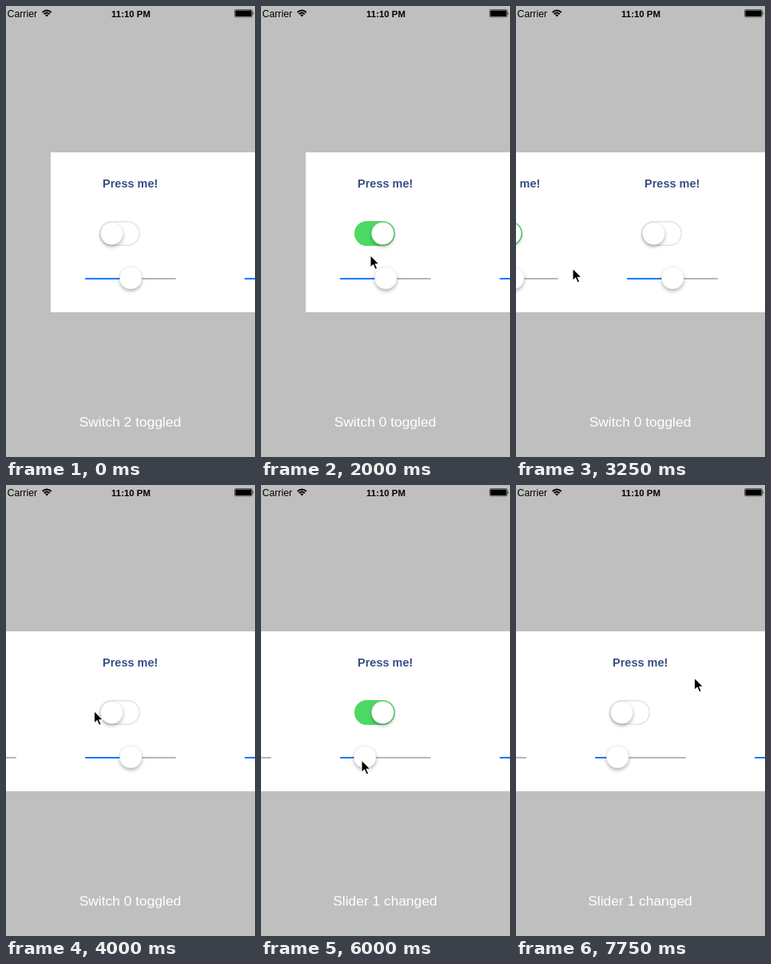
Animation, 312 px wide and 564 px high, one loop 8 s. Source, as an HTML page:

```html
<!DOCTYPE html>
<html lang="en">
<head>
<meta charset="utf-8">
<title>Paged controls</title>
<style>
  html, body { margin: 0; width: 100%; height: 100%; overflow: hidden; background: #bfbfbf; }
  svg { display: block; width: 312px; height: 564px; }
  text { font-family: "Liberation Sans", Arial, sans-serif; }
  .button { font-size: 14.5px; font-weight: bold; fill: #365083; text-anchor: middle; }
  .caption { font-size: 17.4px; fill: #fff; text-anchor: middle; }
  .clock { font-size: 11.4px; font-weight: bold; text-anchor: middle; }
  .carrier { font-size: 12.3px; }
  .knob { fill: #fff; stroke: #0002; stroke-width: .5; filter: url(#shadow); }
</style>
</head>
<body>
<svg viewBox="0 0 312 564">
  <defs>
    <filter id="shadow" x="-40%" y="-40%" width="180%" height="190%">
      <feDropShadow dx="0" dy="2.5" stdDeviation="2" flood-opacity=".3"/>
    </filter>
  </defs>
  <rect width="312" height="564" fill="#bfbfbf"/>

  <text class="carrier" x="1.5" y="14">Carrier</text>
  <g fill="none" stroke="#000" stroke-width="1.9">
    <path d="M45.6 8Q51.2 2.9 56.8 8M47.7 10.2Q51.2 7 54.7 10.2"/>
    <path d="M51.2 13.4L49.2 11.4Q51.2 9.8 53.2 11.4Z" fill="#000" stroke="none"/>
  </g>
  <text class="clock" x="156.5" y="14">11:10 PM</text>
  <rect x="286.5" y="4.5" width="22" height="9.4" rx="1.6" fill="none" stroke="#000" stroke-opacity=".65" stroke-width=".8"/>
  <rect x="287.4" y="5.4" width="20.2" height="7.6" rx=".8"/>
  <path d="M309.4 7.5q1.8 1.6 0 3.4z"/>

  <g id="strip"><rect y="183" width="1000" height="200" fill="#fff"/></g>
  <text class="caption" id="caption" x="155.5" y="526"></text>
  <path id="cursor" d="M0 0V15.6L3.6 12.2L6.2 18L8.8 16.8L6.3 11.2H11Z"
        fill="#000" stroke="#fff" stroke-width="1.1" stroke-linejoin="round"/>
</svg>
<script>
const LOOP = 8000, STEP = 250, PAGE = 200, LEFT = 56;
const $ = id => document.getElementById(id);

// Tracks: [time, value, ...] keys joined by straight lines
const scroll = [[2250, 0], [2500, 9], [2750, 30], [3000, 71], [3250, 160], [3500, 196], [3750, 200],
  [6500, 200], [6750, 212], [7000, 262], [7250, 380], [7500, 400]];
const pointer = [[250, 47, 187], [500, 108, 208], [750, 138, 221], [1000, 125.5, 261.5],
  [1250, 130, 280], [1750, 132, 283], [2250, 142, 340], [2500, 133, 340], [2750, 112.5, 340.5],
  [3000, 71, 338], [3500, 71, 318], [3750, 72, 302], [4000, 110.5, 282.5], [4250, 136, 284], [4500, 140, 285],
  [5000, 150, 335], [5250, 151.5, 344.5], [6000, 126, 344], [6250, 148, 289], [6500, 202, 256],
  [6750, 190, 254], [7000, 140, 251], [7250, 124, 248], [7500, 122.5, 247], [7750, 223.5, 241]];
const drag = [[5250, 57], [5500, 49], [6000, 31]];
const captions = [[0, "Switch 2 toggled"], [750, "Button 0 pressed"], [1500, "Switch 0 toggled"],
  [4500, "Switch 1 toggled"], [5250, "Slider 1 changed"]];
const toggles = [1500, 4500];
const levels = [57, 57, 28, 57];

function sample(keys, t) {
  const next = keys.findIndex(k => k[0] > t);
  if (next < 0) return keys[keys.length - 1].slice(1);
  if (next === 0) return keys[0].slice(1);
  const a = keys[next - 1], b = keys[next];
  const p = (t - a[0]) / (b[0] - a[0]);
  return a.slice(1).map((v, i) => v + (b[i + 1] - v) * p);
}

const pages = levels.map((level, i) => {
  const g = document.createElementNS("http://www.w3.org/2000/svg", "g");
  g.setAttribute("transform", `translate(${i * PAGE} 0)`);
  g.innerHTML = `
    <text class="button" x="99.7" y="227">Press me!</text>
    <rect class="body" x="61.75" y="269.75" width="49.5" height="29.5" rx="14.75" stroke-width="1.5"/>
    <circle class="knob switch" cy="284.5" r="14"/>
    <rect x="43" y="340" width="114" height="2" rx="1" fill="#b7b7b7"/>
    <rect class="fill" x="43" y="340" height="2" rx="1" fill="#007aff"/>
    <circle class="knob thumb" cy="340" r="14"/>`;
  $("strip").append(g);
  const set = (part, name, value) => g.querySelector(part).setAttribute(name, value);
  return (on, value) => {
    set(".body", "fill", on ? "#4cd964" : "#fff");
    set(".body", "stroke", on ? "#4cd964" : "#e3e3e3");
    set(".switch", "cx", on ? 96.5 : 76.5);
    set(".fill", "width", value);
    set(".thumb", "cx", 43.3 + value);
  };
});

function draw(t) {
  const [offset] = sample(scroll, t), [x, y] = sample(pointer, t);
  $("strip").setAttribute("transform", `translate(${LEFT - offset} 0)`);
  pages.forEach((update, i) => update(t >= toggles[i], i === 1 ? sample(drag, t)[0] : levels[i]));
  $("caption").textContent = captions.filter(c => c[0] <= t).pop()[1];
  $("cursor").setAttribute("transform", `translate(${x} ${y})`);
  $("cursor").setAttribute("visibility", t < pointer[0][0] ? "hidden" : "visible");
}

const start = performance.now();
let shown = -1;
function tick() {
  const t = Math.floor((performance.now() - start) % LOOP / STEP) * STEP;
  if (t !== shown) draw(shown = t);
  requestAnimationFrame(tick);
}
tick();
</script>
</body>
</html>
```
